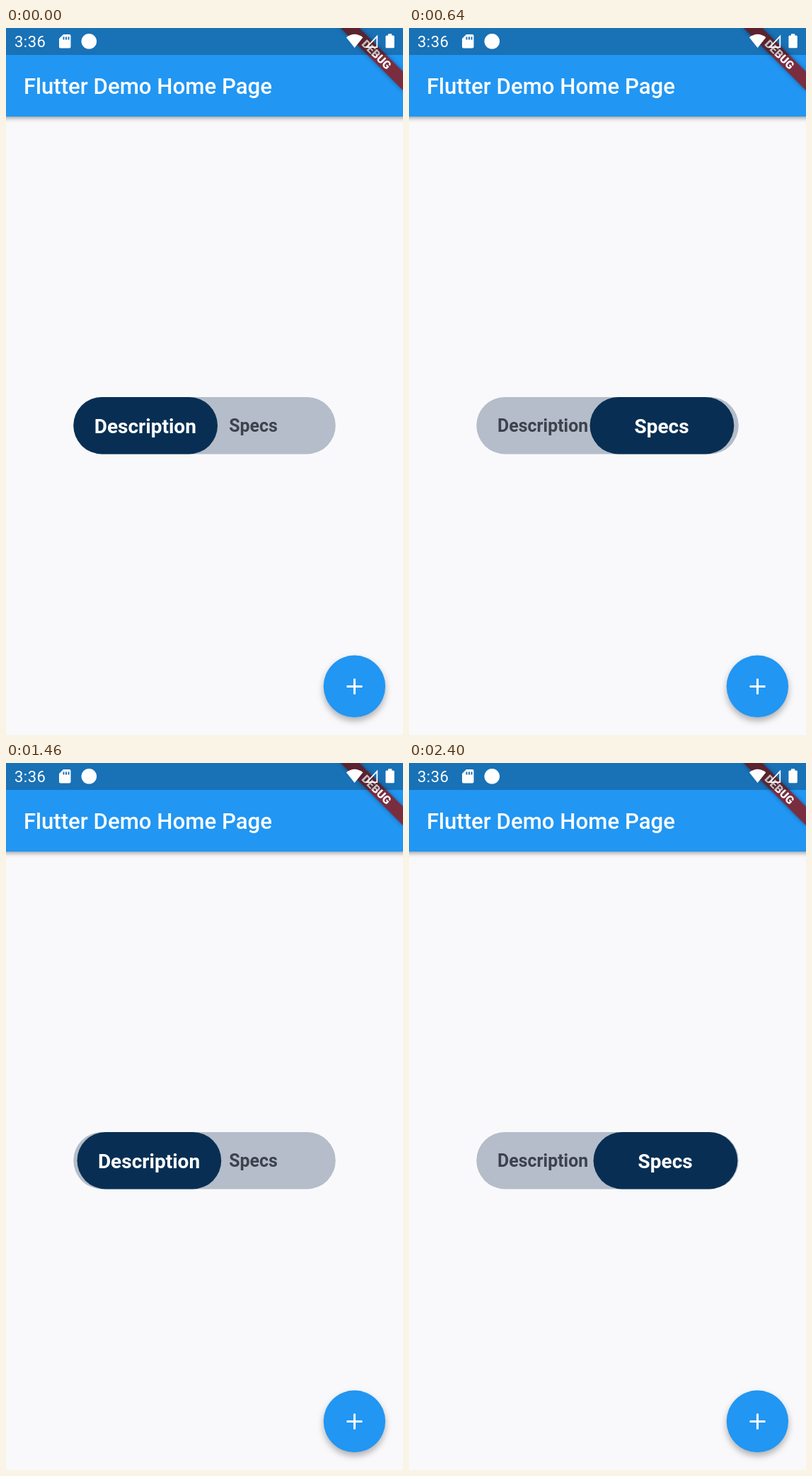
An HTML page that plays this animation: 561 by 998 pixels, repeating every 2500 ms.

```html
<!DOCTYPE html>
<html lang="en">
<head>
<meta charset="utf-8">
<title>Sliding toggle</title>
<style>
  html, body { margin: 0; width: 100%; height: 100%; overflow: hidden; background: #f9f9fb; }
  svg { display: block; width: 561px; height: 998px; font-family: Roboto, sans-serif; }
  .bar { fill: #2196f3; filter: drop-shadow(0 2px 3px rgba(0, 0, 0, .4)); }
  .fab { fill: #2196f3; filter: drop-shadow(0 5px 5px rgba(0, 0, 0, .3)); }
  .ribbon { fill: #792d3f; filter: drop-shadow(0 0 3px rgba(0, 0, 0, .35)); }
  .title { font-size: 31.2px; font-weight: 500; }
  .tab { font-size: 24.9px; font-weight: 700; fill: #3c434d; }
  .active { font-size: 28px; font-weight: 700; }
  .debug { font-size: 15.9px; font-weight: 900; }
  .clock { font-size: 22px; letter-spacing: .5px; }
  .mid { text-anchor: middle; }
</style>
</head>
<body>
<svg viewBox="0 0 561 998" fill="#fff">
  <rect width="561" height="998" fill="#f9f9fb"/>
  <rect class="bar" x="-10" y="-10" width="581" height="135"/>
  <text class="title" x="24.9" y="93">Flutter Demo Home Page</text>

  <rect x="95.3" y="521" width="370.4" height="80.4" rx="40.2" fill="#b4bdc9"/>
  <text class="tab" x="125" y="570.3">Description</text>
  <text class="tab" x="315.2" y="570.3">Specs</text>
  <g id="pill">
    <rect x="95.3" y="521" width="203.7" height="80.4" rx="40.2" fill="#082f53"/>
    <text id="label" class="active mid" x="196.8" y="572">Description</text>
  </g>

  <circle class="fab" cx="492.4" cy="929.3" r="43.7"/>
  <path d="M481.5 929.5h22M492.5 918.5v22" stroke="#fff" stroke-width="3.1"/>

  <g transform="translate(561 0) rotate(45)">
    <rect class="ribbon" x="-62.3" y="43.6" width="124.6" height="18.7"/>
    <text class="debug mid" y="58.6">DEBUG</text>
  </g>

  <!-- status bar -->
  <rect width="561" height="38" fill="#000" fill-opacity=".25"/>
  <text class="clock" x="12" y="27">3:36</text>
  <path fill-rule="evenodd" d="M81 9h8.500q2 0 2 2v15.500q0 2-2 2h-12.500q-2 0-2-2v-11.500zM80.500 12.500v4h2v-4zM84 12.500v4h2v-4zM87.500 12.500v4h2v-4z"/>
  <circle cx="117.300" cy="18.800" r="10.800"/>
  <path d="M492.600 28L480.800 13.300Q492.600 4.300 504.400 13.300z"/>
  <path d="M509.700 27.200H524.300V11.800z" fill="none" stroke="#fff" stroke-width="1.800"/>
  <path d="M540 10.500v-2.300h5.200v2.300h2q1.600 0 1.600 1.600v14.600q0 1.600-1.600 1.600h-9.200q-1.600 0-1.600-1.600v-14.600q0-1.600 1.600-1.600z"/>
</svg>
<script>
  const LOOP = 2500, TRAVEL = 166.6, LABEL_LEAD = 80;
  const moves = [
    { start: 236, time: 1150, to: 1, label: "Specs" },
    { start: 1084, time: 1000, to: 0, label: "Description" },
    { start: 1850, time: 1000, to: 1, label: "Specs" }
  ];
  const pill = document.getElementById("pill");
  const label = document.getElementById("label");

  // cubic-bezier(.18, 1, .04, 1), solved by bisection
  function ease(t) {
    if (t <= 0) return 0;
    if (t >= 1) return 1;
    let lo = 0, hi = 1;
    for (let i = 0; i < 24; i++) {
      const s = (lo + hi) / 2, r = 1 - s;
      if (3 * r * r * s * .18 + 3 * r * s * s * .04 + s ** 3 < t) lo = s;
      else hi = s;
    }
    return 1 - (1 - lo) ** 3;
  }

  // the picture advances in steps of 100 ms, some of them 120 ms
  function stepTime(t) {
    let at = 0;
    for (let i = 0; ; i++) {
      const next = at + (i === 0 || i % 6 === 3 ? 120 : 100);
      if (next > t) return at;
      at = next;
    }
  }

  function draw(t) {
    let pos = 0, name = "Description";
    for (const m of moves) {
      if (t >= m.start - LABEL_LEAD) name = m.label;
      pos += (m.to - pos) * ease((t - m.start) / m.time);
    }
    pill.setAttribute("transform", `translate(${(pos * TRAVEL).toFixed(2)} 0)`);
    if (label.textContent !== name) label.textContent = name;
  }

  const begin = performance.now();
  function tick() {
    draw(stepTime((performance.now() - begin) % LOOP));
    requestAnimationFrame(tick);
  }
  tick();
</script>
</body>
</html>
```
